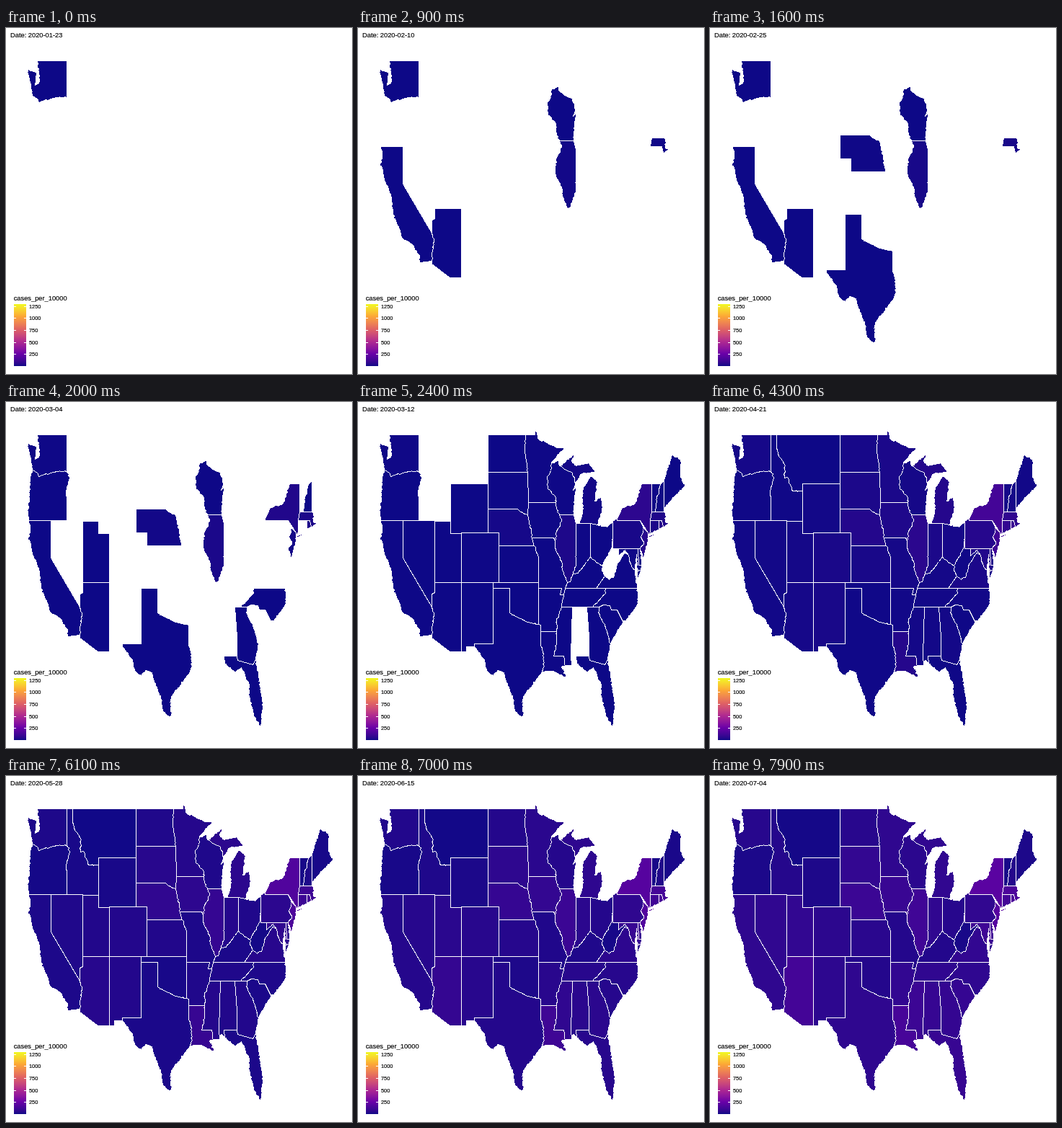
These frames come from a looping animation (480 px wide and 480 px high, 8000 ms). An HTML page:

```html
<!DOCTYPE html>
<html lang="en">
<head>
<meta charset="utf-8">
<title>Cases per 10000 by state</title>
<style>
html, body { margin: 0; width: 100%; height: 100%; overflow: hidden; background: #fff; }
svg { display: block; width: 480px; height: 480px; }
text { font-family: "Liberation Sans", Arial, sans-serif; font-size: 9.3px; fill: #000; stroke: #000; stroke-width: 0.15; }
.label { font-size: 7.4px; }
#map, #ticks { stroke: #fff; stroke-width: 1; shape-rendering: crispEdges; }
</style>
</head>
<body>
<svg viewBox="0 0 480 480">
  <defs><linearGradient id="ramp" x1="0" y1="1" x2="0" y2="0"></linearGradient></defs>
  <g id="map"></g>
  <text id="date" x="6" y="13"></text>
  <text x="10.7" y="378">cases_per_10000</text>
  <rect x="11" y="383" width="17" height="86" fill="url(#ramp)"></rect>
  <g id="ticks"></g>
</svg>
<script>
const STEP = 100, LOOP = 8000, DAYS_PER_STEP = 205 / 99, LAST_DAY = 163, MAX = 1310;
const PLASMA = ['#0d0887', '#6a00a8', '#b12a90', '#e16462', '#fca636', '#f0f921'];

// Exponents of the growth curve.
const EARLY = 0.5, STEADY = 1.2, LATE = 2.3, SURGE = 3.8;

// Rivers and ridges shared by two neighbours; the bends between key points are generated.
const BORDERS = {
  columbia: '84,96 69,96 50,101 45,103 43,98 36,94',
  snake: '84,96 88,104 83,123 84,138',
  bitterroot: '92,64 94,72 103,86 103,105 107,104 114,123 128,123',
  colorado: '102,284 105,296 103,310 102,323',
  red: '210,292 224,300 236,305 250,308',
  sabine: '253,336 257,349 257,368 255,374',
  rednorth: '232,45 231,63 235,97',
  niobrara: '220,148 225,152 235,157',
  missouri: '235,157 240,181 241,188',
  nemaha: '241,188 244,199',
  kansas: '244,199 246,204 250,215',
  croix: '268,84 267,95 262,103 263,118 274,133 274,139',
  dubuque: '274,139 275,148 279,156',
  quad: '279,156 282,165 275,180 273,192',
  louis: '273,192 273,201 282,222 283,233 290,250',
  memphis: '285,267 282,284',
  delta: '282,284 275,303 275,318',
  natchez: '275,318 275,332 271,352',
  pearl: '285,352 287,366',
  wabash: '302,210 302,225 298,237',
  cairo: '298,237 294,249 290,250',
  ohio: '298,237 305,237 317,221 322,214',
  portsmouth: '322,214 330,222 338,226',
  wheeling: '338,226 344,216 352,199 353,188',
  tug: '338,226 338,231 342,241',
  alleghany: '342,241 348,246 355,241 359,225 369,209 374,211',
  potomac: '374,211 370,205 361,213',
  tidewater: '374,211 379,228 384,233',
  smoky: '344,258 342,266 325,284',
  savannah: '334,284 333,291 343,312 350,335',
  brule: '280,88 290,95 297,98 301,112',
  delaware: '396,175 392,187 396,196 391,203',
  connecticut: '420,113 415,129 413,143 412,152'
};

// First day, cases per 10000 on the last day, growth curve, outline.
// "~" toggles a rough line, "+x" / "-x" follow a border, ";" starts a new ring.
const STATES = [
  [-2, 48, LATE, '84,45 +columbia ~ 35,86 32,70 29,57 42,62 40,79 46,75 43,45 ~ ; 41,70 43,71 42,74'],
  [36, 24, LATE, '84,164 -snake +columbia ~ 33,106 30,153 31,164 ~'],
  [2, 66, SURGE, '62,164 62,216 102,284 +colorado 85,325 ~ 85,316 74,299 60,291 58,280 48,258 46,235 35,207 34,196 30,190 33,176 31,164 ~'],
  [42, 70, LATE, '62,164 106,164 106,264 102,266 102,284 62,216'],
  [50, 43, LATE, '84,45 92,45 +bitterroot 128,165 84,164 -snake'],
  [50, 11, LATE, '92,45 180,45 180,113 128,113 -bitterroot'],
  [48, 28, STEADY, '128,113 180,113 180,181 128,182'],
  [34, 76, LATE, '106,165 128,165 128,182 143,182 143,250 106,250'],
  [3, 130, SURGE, '106,250 143,250 143,346 127,346 102,327 -colorado 102,266 106,264'],
  [48, 61, STEADY, '143,250 187,250 187,335 161,335 161,339 150,339 150,346 143,346'],
  [42, 59, STEADY, '143,181 195,181 195,250 143,250'],
  [48, 49, STEADY, '180,45 +rednorth 180,97'],
  [47, 79, STEADY, '180,97 235,97 236,139 235,157 -niobrara 180,148'],
  [25, 101, STEADY, '180,148 +niobrara +missouri +nemaha 195,199 195,181 180,181'],
  [44, 55, STEADY, '195,199 +kansas 250,250 195,250'],
  [43, 39, LATE, '187,250 250,250 250,308 -red 210,258 187,258'],
  [20, 67, SURGE, '187,258 210,258 +red 253,309 +sabine ~ 232,404 228,413 229,438 217,429 215,412 205,386 202,375 193,372 187,380 178,372 175,357 161,339 ~ 161,335 187,335'],
  [43, 67, STEADY, '232,45 245,45 245,40 248,41 ~ 250,51 273,62 286,63 268,84 ~ +croix 236,139 235,97 -rednorth'],
  [45, 97, STEADY, '236,139 +dubuque +quad 271,188 -missouri'],
  [44, 39, STEADY, '241,188 271,188 +louis 287,258 285,267 280,267 282,258 250,258 -kansas -nemaha'],
  [48, 76, LATE, '250,258 282,258 280,267 +memphis +delta 253,318 253,309 250,308'],
  [46, 140, STEADY, '253,318 +natchez +pearl ~ 282,367 290,383 271,373 255,374 ~ -sabine'],
  [13, 57, LATE, '268,84 ~ 277,81 280,88 ~ +brule ~ 298,122 304,113 300,134 299,156 ~ -dubuque -croix'],
  [1, 117, STEADY, '279,156 299,156 302,168 302,210 +wabash +cairo -louis -quad'],
  [47, 72, EARLY, '307,168 322,168 332,170 ~ 339,146 337,131 328,137 332,111 322,101 311,122 311,150 307,168 ~ ; 280,88 ~ 299,72 296,82 302,88 320,84 328,97 310,99 301,112 ~ -brule'],
  [43, 71, STEADY, '302,168 322,168 322,214 -ohio -wabash'],
  [46, 48, STEADY, '322,168 332,170 ~ 345,173 353,165 ~ 353,188 -wheeling -portsmouth'],
  [43, 37, STEADY, '290,250 -cairo +ohio +portsmouth +tug 330,258 287,258'],
  [42, 71, LATE, '287,258 344,258 +smoky 282,284 -memphis'],
  [48, 103, LATE, '282,284 297,284 295,352 296,364 ~ 287,366 ~ -pearl 271,352 -natchez -delta'],
  [50, 87, LATE, '297,284 317,284 320,325 320,352 302,352 303,362 ~ 298,358 296,364 ~ 295,352'],
  [39, 82, LATE, '317,284 +savannah ~ 346,357 ~ 342,364 321,358 320,352 320,325'],
  [38, 89, SURGE, '302,352 320,352 321,358 342,364 346,357 ~ 353,396 356,422 353,451 344,436 337,408 337,392 326,368 318,374 303,363 ~'],
  [43, 84, SURGE, '334,284 340,281 349,282 351,288 359,288 367,304 ~ 350,335 ~ -savannah'],
  [40, 68, LATE, '344,258 387,258 ~ 388,279 372,302 367,304 ~ 359,288 351,288 349,282 340,281 334,284 -smoky'],
  [44, 76, STEADY, '330,258 342,241 +alleghany +tidewater ~ 385,243 387,258 ~ ; 387,234 392,233 387,247'],
  [54, 18, STEADY, '353,188 353,203 361,203 -potomac -alleghany -tug +wheeling'],
  [42, 114, STEADY, '361,203 388,203 389,226 393,226 392,233 ~ 387,234 386,211 384,233 ~ -tidewater +potomac'],
  [48, 122, STEADY, '388,203 391,203 ~ 393,226 ~ 389,226'],
  [43, 73, EARLY, '353,165 359,161 359,164 391,164 +delaware 353,203'],
  [41, 195, EARLY, '396,175 402,181 ~ 402,193 395,216 391,203 ~ -delaware'],
  [38, 206, EARLY, '359,161 ~ 366,146 384,141 393,113 ~ 407,113 407,152 405,164 405,179 402,186 402,181 391,164 359,164 ; 401,189 ~ 404,185 417,181 ~'],
  [45, 131, EARLY, '405,164 417,164 417,176 ~ 404,182 ~ 405,179'],
  [38, 161, EARLY, '417,164 421,164 423,173 417,176'],
  [9, 159, STEADY, '407,152 424,152 ~ 426,154 426,166 431,169 423,173 ~ 421,164 405,164 ; 426,174 429,174 428,176'],
  [44, 20, EARLY, '407,113 +connecticut 407,152'],
  [39, 43, STEADY, '420,113 424,108 424,152 -connecticut'],
  [49, 25, STEADY, '424,108 ~ 429,92 436,73 447,79 447,102 453,116 438,131 424,147 ~']
];

const $ = id => document.getElementById(id);
const lerp = (a, b, k) => a + (b - a) * k;

function make(tag, attrs, parent) {
  const el = document.createElementNS('http://www.w3.org/2000/svg', tag);
  for (const key in attrs) el.setAttribute(key, attrs[key]);
  return parent.appendChild(el);
}

// The scale is blended in Lab space.
function plasma(k) {
  const pos = Math.min(Math.max(k, 0), 1) * (PLASMA.length - 1);
  const i = Math.min(Math.floor(pos), PLASMA.length - 2);
  return `color-mix(in lab, ${PLASMA[i]}, ${PLASMA[i + 1]} ${((pos - i) * 100).toFixed(2)}%)`;
}

// Repeatable offset that depends on the place only.
function wobble(x, y) {
  const s = Math.sin(x * 12.9898 + y * 78.233) * 43758.5453;
  return (s - Math.floor(s) - 0.5) * 1.8;
}

// Always roughened in one direction, so neighbours meet exactly.
function roughen(a, b) {
  const flip = a[0] > b[0] || (a[0] === b[0] && a[1] > b[1]);
  const [p, q] = flip ? [b, a] : [a, b];
  const n = Math.ceil(Math.hypot(q[0] - p[0], q[1] - p[1]) / 2.5), out = [];
  for (let i = 1; i < n; i++) {
    const x = lerp(p[0], q[0], i / n), y = lerp(p[1], q[1], i / n);
    out.push([x + wobble(x, y), y + wobble(y, x)]);
  }
  return flip ? out.reverse() : out;
}

function ring(text) {
  const pts = [];
  let rough = false, last = null;
  const point = s => s.split(',').map(Number);
  const add = (p, bumpy) => {
    if (last && bumpy) pts.push(...roughen(last, p));
    pts.push(p);
    last = p;
  };
  for (const token of text.trim().split(/\s+/)) {
    if (token === '~') rough = !rough;
    else if (/^[+-]/.test(token)) {
      const line = BORDERS[token.slice(1)].split(' ').map(point);
      if (token[0] === '-') line.reverse();
      line.forEach((p, i) => add(p, i > 0));
    } else add(point(token), rough);
  }
  return 'M' + pts.map(p => p.map(v => (v + 0.5).toFixed(1)).join(' ')).join('L') + 'Z';
}

const areas = STATES.map(([first, total, curve, outline]) => ({
  first, total, curve,
  el: make('path', { d: outline.split(';').map(ring).join('') }, $('map'))
}));

for (let k = 0; k <= 20; k++) {
  make('stop', { offset: k / 20 }, $('ramp')).style.stopColor = plasma(k / 20);
}

for (let v = 250; v <= 1250; v += 250) {
  const y = Math.round(468.6 - v * 0.0662);
  make('path', { d: `M11 ${y + 0.5}h3.4M24.6 ${y + 0.5}h3.4` }, $('ticks'));
  make('text', { x: 32, y: y + 3, class: 'label' }, $('ticks')).textContent = v;
}

function draw(now) {
  const step = Math.floor((Math.max(0, now - start) % LOOP) / STEP);
  if (step !== shown) {
    shown = step;
    const time = step * DAYS_PER_STEP, day = Math.floor(time);
    $('date').textContent = 'Date: ' + new Date(Date.UTC(2020, 0, 23 + day)).toISOString().slice(0, 10);
    for (const { first, total, curve, el } of areas) {
      el.style.display = day >= first ? '' : 'none';
      const grown = Math.max(0, time - first) / (LAST_DAY - first);
      el.style.fill = plasma(total * grown ** curve / MAX);
    }
  }
  requestAnimationFrame(draw);
}

let shown = -1;
const start = performance.now();
draw(start);
</script>
</body>
</html>
```
